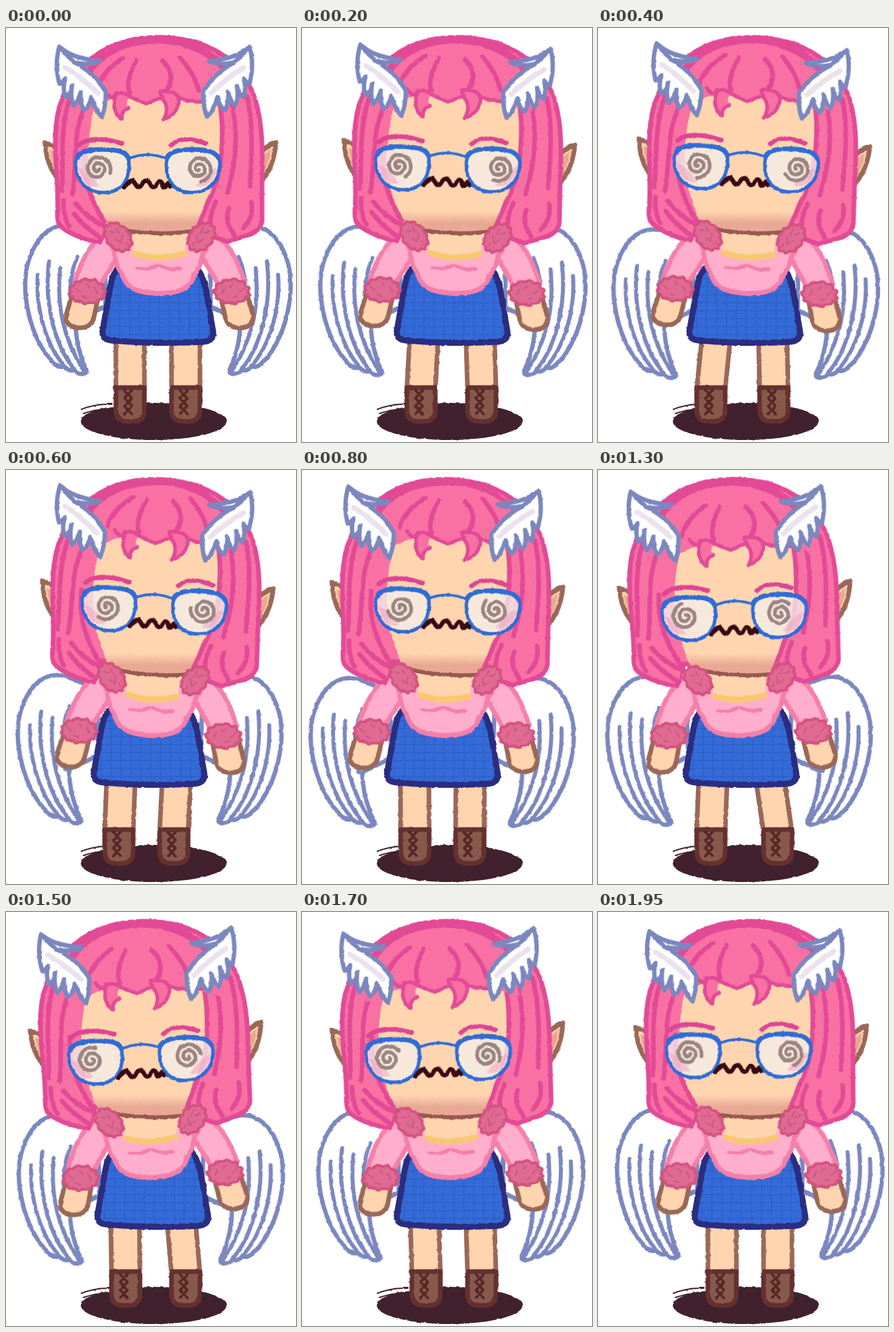
Write an HTML page that moves like this. It is 438 px wide and 624 px high and loops after 2 s.

```html
<!DOCTYPE html>
<html lang="en">
<head>
<meta charset="utf-8">
<title>Dizzy winged elf</title>
<style>
html, body { margin: 0; width: 100%; height: 100%; overflow: hidden; background: #fff; }
svg { display: block; width: 438px; height: 624px; fill: none; stroke-linecap: round; stroke-linejoin: round; }
.part { filter: url(#crayon); }
.feather { fill: #fff; stroke: #7b87be; stroke-width: 6.5; }
.skin { fill: #ffd5b0; stroke: #996858; stroke-width: 7; }
.hair { fill: #f971a3; }
.strand { stroke: #e24a96; stroke-width: 7; }
.knit { fill: #ffaecb; stroke: #f57fab; stroke-width: 7; }
.fluff { fill: #df6a92; stroke: #d4527f; stroke-width: 4; }
.boot { fill: #87594c; stroke: #653030; stroke-width: 7; }
.frame { stroke: #2f6cd4; }
.spiral { stroke: #9b8583; stroke-width: 5.5; }
</style>
</head>
<body>
<svg viewBox="0 0 438 624">
<defs>
  <filter id="crayon" filterUnits="userSpaceOnUse" x="-40" y="-20" width="520" height="680" color-interpolation-filters="sRGB">
    <feTurbulence type="fractalNoise" baseFrequency=".13" numOctaves="2" seed="4"/>
    <feDisplacementMap in="SourceGraphic" scale="3" xChannelSelector="R" yChannelSelector="G"/>
  </filter>
  <pattern id="grid" width="15" height="12" patternUnits="userSpaceOnUse">
    <path fill="#356bd8" d="M0 0H15V12H0Z"/>
    <path d="M7 0V12M0 6H15" stroke="#2f61ca" stroke-width="2"/>
  </pattern>
  <linearGradient id="chin" x1="0" y1="276" x2="0" y2="294" gradientUnits="userSpaceOnUse">
    <stop stop-color="#ffd5b0"/><stop offset="1" stop-color="#e8a894"/>
  </linearGradient>

  <g id="wing">
    <path class="feather" d="M112 303C82 289 58 303 43 330C26 360 27 395 33 425C41 465 60 496 76 508Q84 513 87 509Q96 519 102 515Q110 523 118 521Q124 519 120 512C109 488 105 466 105 440L150 420V320Z"/>
    <path d="M48 372C44 425 62 480 88 509M65 352C57 412 73 478 103 514M82 362C76 418 86 468 118 517M108 345C96 368 94 410 100 440" stroke="#7b87be" stroke-width="6"/>
  </g>

  <g id="arm">
    <path class="skin" d="M99 404L91 432Q89 451 110 452Q130 452 133 435L139 408Z"/>
    <path class="knit" d="M150 310C130 320 114 350 104 382L142 390C148 375 160 360 168 345Z"/>
  </g>
  <g id="cuff">
    <path class="fluff blob" data-at="123 397 26 18 0"/>
    <path d="M104 392l8 6M120 386l6 5M134 392l4 8M115 404l7 3" stroke="#cf5482" stroke-width="2"/>
  </g>
  <g id="ruffle">
    <path class="fluff blob" data-at="169 315 24 17 48"/>
    <path d="M157 306l8 3M166 301l5 9M176 312l-2 9M166 318l9 6M180 323l2 5" stroke="#cf5482" stroke-width="2"/>
  </g>

  <g id="ear">
    <path class="skin" d="M60 173C75 177 86 188 92 205V240C74 228 62 202 60 173Z"/>
    <path fill="#eba78f" d="M67 183Q80 188 84 205L82 222Q70 208 67 183Z"/>
  </g>
  <g id="horn">
    <path class="feather" d="M84 30Q102 46 143 50Q127 57 106 52"/>
    <path class="feather" d="M82 28Q100 50 112 56Q138 72 152 96Q152 120 146 134Q137 126 130 104Q128 118 119 124Q113 114 114 97Q110 112 103 117Q98 104 101 87Q98 100 91 104Q86 90 91 76Q86 83 82 84Q74 55 82 28Z"/>
    <path d="M91 60Q115 74 140 98" stroke="#ece2ee" stroke-width="8"/>
  </g>
  <path id="rim" d="M105 206C103 190 120 183 146 183C174 183 186 190 186 206C186 232 172 248 148 248C122 248 106 232 105 206Z"/>
  <g id="lens">
    <use href="#rim" fill="#f5ede8" fill-opacity=".78"/>
    <path d="M110 210Q128 218 141 238Q116 244 110 210Z" fill="#ee9dc0" fill-opacity=".5"/>
  </g>
  <g id="glass" class="frame">
    <use href="#rim" stroke-width="5"/>
    <path d="M107 196C112 186 126 183 146 183C168 183 181 187 185 195" stroke-width="7"/>
  </g>
  <g id="boot">
    <path class="boot" d="M166 542H209V575Q209 593 191 593H184Q166 593 166 575Z"/>
    <path d="M179 546l11 12l-11 12l11 12M190 546l-11 12l11 12l-11 12" stroke="#572626" stroke-width="4"/>
  </g>
</defs>

<g id="wingL" class="part"><use href="#wing"/></g>
<g id="wingR" class="part"><use href="#wing" transform="translate(459) scale(-1 1)"/></g>

<g class="part">
  <ellipse cx="223" cy="593" rx="110" ry="28" fill="#40212d"/>
  <path d="M113 575Q135 566 160 567M117 581Q135 575 148 575" stroke="#40212d" stroke-width="2"/>
  <path d="M116 578Q136 571 162 570" stroke="#fff" stroke-width="3"/>
</g>

<g class="part">
  <path id="legL" class="skin"/><path id="legR" class="skin"/>
  <g id="bootL"><use href="#boot"/></g>
  <g id="bootR"><use href="#boot" x="84"/></g>
</g>

<g id="skirt" class="part">
  <path fill="url(#grid)" stroke="#2b2d80" stroke-width="9" d="M172 360C161 368 158 385 155 405L146 456Q144 470 160 471Q230 477 298 473Q314 472 313 458L304 405C301 385 296 370 287 360Z"/>
</g>

<g class="torso part">
  <use href="#arm"/><use href="#arm" transform="translate(464) scale(-1 1)"/>
  <path class="knit" d="M166 318H296C301 340 293 362 284 372C280 392 262 400 230 400C196 400 180 390 176 372C167 360 160 340 166 318Z"/>
  <path d="M198 362Q215 366 228 358M233 358Q248 366 263 362" stroke="#f57fab" stroke-width="5"/>
  <path fill="#ffd5b0" d="M188 300H273L270 338Q230 352 192 338Z"/>
  <path d="M195 340Q230 352 268 340" stroke="#f8c871" stroke-width="9"/>
  <use href="#cuff"/><use href="#cuff" transform="translate(464) scale(-1 1)"/>
</g>

<g class="head part">
  <use href="#ear"/><use href="#ear" transform="translate(469) scale(-1 1)"/>
  <path class="hair strand" d="M228 14C304 14 350 45 373 95C392 140 388 200 388 240V284Q390 306 364 313L336 322L312 314L285 290H155L143 323Q108 317 86 301Q78 296 79 276C81 235 75 205 76 165C76 70 145 14 228 14Z"/>
  <path d="M124 70C146 32 190 18 228 18C275 18 320 38 342 76" stroke="#e24a96" stroke-width="11"/>
</g>

<g id="skin" class="part">
  <path fill="url(#chin)" d="M140 98H330V240L302 303Q228 314 150 300C142 285 124 245 123 205C121 160 130 125 140 98Z"/>
  <path d="M150 299Q225 318 300 303" stroke="#985a4f" stroke-width="6"/>
</g>

<g class="head part">
  <path class="hair" d="M100 90L140 104C128 135 122 190 128 230Q134 265 152 292L146 316L92 300Z"/>
  <path class="hair" d="M322 96C328 180 324 235 306 262L290 302L314 312L360 308L372 96Z"/>
  <path class="strand" d="M98 105C82 150 88 205 86 245M119 122C101 160 108 215 102 250M120 185C116 225 130 262 150 291M107 265Q124 287 154 300M104 280Q122 303 146 317M88 260Q87 285 97 299"/>
  <path class="strand" d="M324 112C332 160 328 225 307 260Q300 280 290 303M343 116C353 165 347 210 336 248M365 103C376 145 372 200 370 238M318 262Q304 288 315 313M338 272Q330 290 346 312M372 262Q376 285 360 301"/>
</g>

<g class="face part">
  <path class="hair" d="M108 126C110 70 160 27 220 26C285 27 335 75 340 124L308 114Q285 112 263 106Q262 130 238 139Q247 120 235 105L212 115L188 104Q179 110 185 122Q174 128 175 139Q159 130 162 106Q145 112 132 118Z"/>
  <path class="strand" style="stroke-width:5.5px" d="M150 96Q160 112 166 98Q158 127 175 137Q173 126 185 121M162 105Q172 91 188 104L212 114L236 104Q228 92 240 96Q257 94 262 108Q259 131 238 138Q248 120 236 106M262 106Q285 113 309 111"/>
  <path class="strand" d="M176 46Q145 66 139 90M197 49Q181 76 186 97M236 49Q259 70 242 95M263 45Q284 68 291 94"/>
  <path d="M109 177Q128 160 175 174M249 177Q266 160 301 174" stroke="#df4592" stroke-width="7"/>
</g>

<g class="head part">
  <use href="#horn"/><use href="#horn" transform="translate(451) scale(-1 1)"/>
</g>

<g class="torso part">
  <use href="#ruffle"/><use href="#ruffle" transform="translate(464) scale(-1 1)"/>
</g>

<g class="face part">
  <use href="#lens"/><use href="#lens" transform="translate(428) scale(-1 1)"/>
  <path id="eyeL" class="spiral"/><path id="eyeR" class="spiral"/>
  <use href="#glass"/><use href="#glass" transform="translate(428) scale(-1 1)"/>
  <path class="frame" stroke-width="4" d="M185 197Q213 185 243 197"/>
  <path d="M179 240C183 235 187 229 191 230C195 231 196 241 201 240C206 239 205 230 212 230C218 230 218 241 223 240C228 239 227 231 232 231C237 231 237 240 240 240C243 239 243 234 244 234L248 239" stroke="#390a13" stroke-width="6.5"/>
</g>
</svg>

<script>
const $ = id => document.getElementById(id);
const { sin, cos, PI, min, max } = Math;
const LOOP = 2000, STEP = 50;

const put = (el, transform) => el.setAttribute('transform', transform);
const putAll = (name, transform) => document.querySelectorAll('.' + name).forEach(el => put(el, transform));
const curve = (n, point) => 'M' + Array.from({ length: n + 1 }, (_, i) => point(i / n).map(v => v.toFixed(1))).join('L');

// Scalloped ellipses for the fluffy trim
document.querySelectorAll('.blob').forEach(el => {
  const [x, y, rx, ry, turn] = el.dataset.at.split(' ').map(Number);
  el.setAttribute('d', curve(90, u => {
    const a = u * 2 * PI, r = 1 + .06 * cos(11 * a);
    return [rx * r * cos(a), ry * r * sin(a)];
  }) + 'Z');
  put(el, `translate(${x} ${y}) rotate(${turn})`);
});

const spiral = curve(80, u => {
  const a = u * 2 * 2 * PI, r = 2 + 18 * u;
  return [r * cos(a), r * sin(a)];
});
$('eyeL').setAttribute('d', spiral);
$('eyeR').setAttribute('d', spiral);

const ease = (t, from, to) => {
  const u = max(0, min(1, (t - from) / (to - from)));
  return u * u * (3 - 2 * u);
};
const leg = (id, x, hip, foot) => $(id).setAttribute('d',
  `M${x + hip} 455L${x + foot} 545H${x + 43 + foot}L${x + 43 + hip} 455Z`);

function draw(t) {
  const wave = lag => cos((t - lag) / LOOP * 2 * PI);
  const s = wave(500);

  const wx = -10 + 10 * wave(20), wy = 8 - 8 * wave(0), flap = 1 - wave(0);
  put($('wingL'), `translate(${wx} ${wy}) rotate(${-flap} 140 330)`);
  put($('wingR'), `translate(${wx} ${wy}) rotate(${flap} 319 330)`);

  const hip = -9.2 + 9.2 * wave(-50);
  const footL = -17 * (ease(t, 50, 370) - ease(t, 1300, 1650));
  const footR = -18 * (ease(t, 300, 560) - ease(t, 1020, 1290));
  leg('legL', 166, hip, footL);
  leg('legR', 250, hip, footR);
  put($('bootL'), `translate(${footL})`);
  put($('bootR'), `translate(${footR})`);
  put($('skirt'), `translate(${hip})`);

  putAll('torso', `translate(${-9.8 + 9.8 * wave(20)}) rotate(${2.2 * s} 232 390)`);
  putAll('head', `translate(${-12.5 + 13 * wave(170)}) rotate(${2.1 * s} 230 300)`);
  putAll('face', `translate(${10 * s} ${-6 * s + 2.5 * s * s}) rotate(${2.3 * s} 214 215)`);
  put($('skin'), `translate(${9 * s})`);

  const spin = t / LOOP * 360;
  put($('eyeL'), `translate(${140.5 - 2.5 * wave(-200)} 212) rotate(${spin + 20})`);
  put($('eyeR'), `translate(${287.5 + 4.5 * wave(200)} 212) rotate(${spin + 80})`);
}

function tick() {
  draw(Math.floor(performance.now() % LOOP / STEP) * STEP);
  requestAnimationFrame(tick);
}
tick();
</script>
</body>
</html>
```
